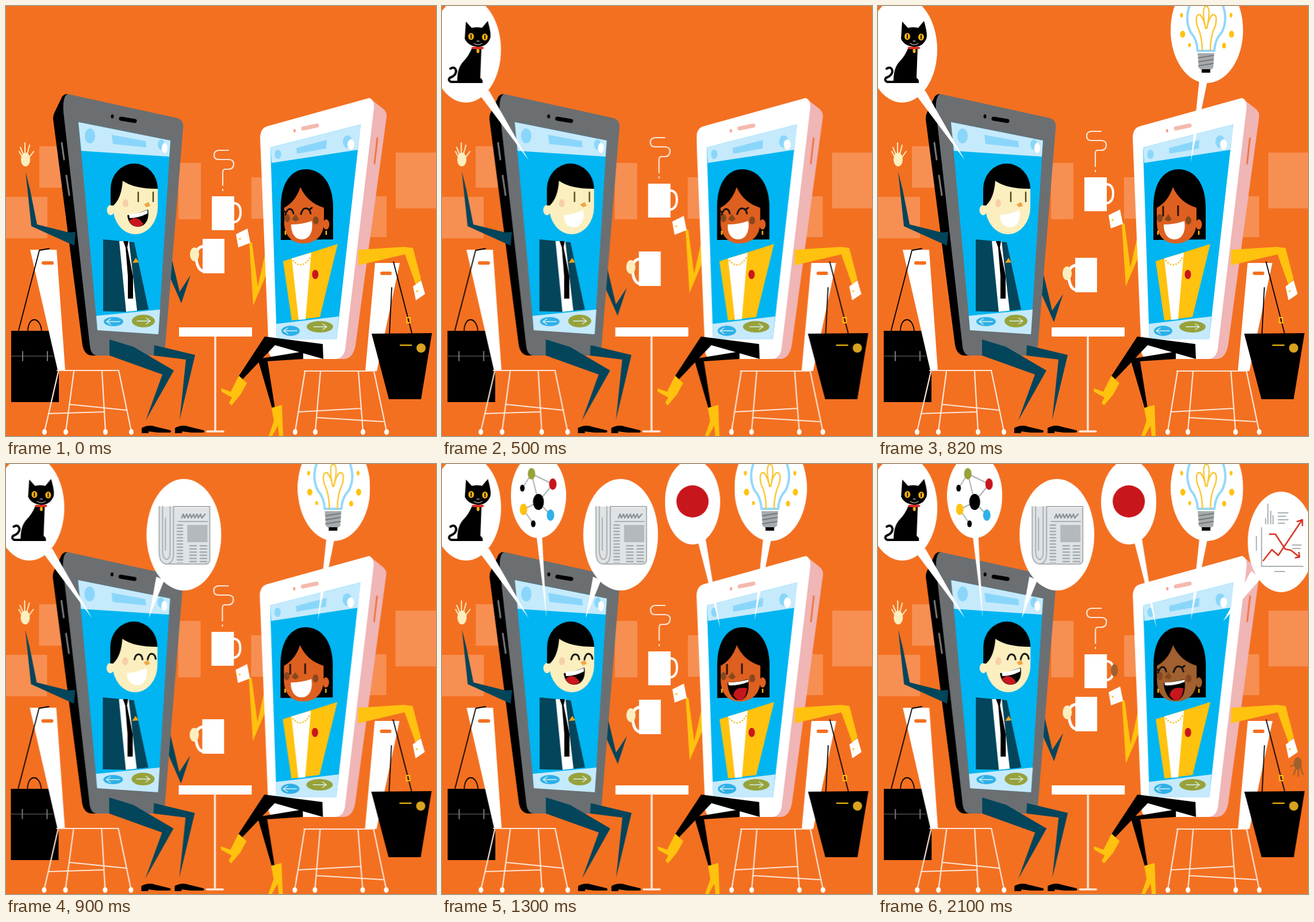
Recreate the animation shown at these times as an HTML page. Size 748 by 748 pixels, loop 2500 ms.

```html
<!DOCTYPE html>
<html lang="en">
<head>
<meta charset="utf-8">
<title>Phone chat</title>
<style>
  html, body { margin: 0; width: 100%; height: 100%; overflow: hidden; background: #f37021; }
  svg { display: block; width: 100%; height: 100%; }
  .line { fill: none; stroke-linecap: round; stroke-linejoin: round; }
  .thin { stroke: #fde6d8; stroke-width: 2.2; }
  .ink { stroke: #000; stroke-width: 1.8; }
  .navy { fill: #03455b; }
  .gold { fill: #ffc20e; }
  .white { fill: #fff; }
  .cream { fill: #fbefbf; }
  .red { fill: #c8161d; }
  .sky { fill: #00b5f1; }
  .pale { fill: #c5eafc; }
  .tint { fill: #8ad6fb; }
  .olive { fill: #97a23b; }
  .blue { fill: #2fb0e8; }
  .square { fill: #f78f52; }
  .skin { fill: #de6020; }
  .freckle { fill: #87471f; }
  .grey { stroke: #a9b0b4; stroke-width: 2; }
  .bubble { opacity: 0; }
</style>
</head>
<body>
<svg viewBox="0 0 748 748" preserveAspectRatio="none">
  <defs>
    <ellipse id="foot" rx="4" ry="5" fill="#fff"/>
    <path id="shoe" d="M236 743V734Q249 727 261 732L286 738Q289 742 284 742H264L248 740V743Z"/>
    <path id="arrow" class="line" stroke="#d8f0ee" stroke-width="1.5" d="M-11 0H11M5 -5L12 0L5 5"/>
  </defs>

  <rect width="748" height="748" fill="#f37021"/>
  <g id="scene">
    <path class="square" d="M58 244h57v72h-57zM-4 332h76v72H-4zM300 273h39v98h-39zM427 298h30v72h-30zM600 331h62v71h-62zM678 255h74v97h-74z"/>

    <!-- left chair and briefcase -->
    <path d="M9 565H92V689H9Z"/>
    <path class="line ink" d="M38 566C38 539 60 539 62 566"/>
    <path class="line" stroke="#4c4c4c" stroke-width="1.5" d="M9 609H82"/>
    <path class="line" stroke="#777" stroke-width="2" d="M29 601V617M72 601V617"/>
    <path class="white" d="M42 424H88L103 634H90Z"/>
    <path class="line" stroke="#f37021" stroke-width="6" d="M65 447H80"/>
    <path class="line ink" d="M22 564L58 425L75 422"/>
    <path class="line thin" d="M89 634H196M91 636L67 740M118 636L104 740M167 636L173 740M196 634L218 740M111 693L209 703M74 709L171 706"/>
    <use href="#foot" x="67" y="741"/><use href="#foot" x="104" y="741"/>
    <use href="#foot" x="173" y="741"/><use href="#foot" x="218" y="741"/>

    <!-- right chair and bag -->
    <path class="white" d="M642 447H685L645 635H625Z"/>
    <path class="line" stroke="#f37021" stroke-width="6" d="M654 465H668"/>
    <path class="line thin" d="M519 635H640M520 636L503 740M547 636L538 740M613 636L621 740M640 635L662 740M510 706L617 700M541 716L656 723"/>
    <use href="#foot" x="503" y="741"/><use href="#foot" x="538" y="741"/>
    <use href="#foot" x="621" y="741"/><use href="#foot" x="662" y="741"/>
    <path d="M636 570L741 569L722 684H666Z"/>
    <path class="line ink" d="M674 445L706 569M671 490L667 570"/>
    <path fill="none" stroke="#ffc20e" stroke-width="1.8" d="M697 542H703V551H697ZM685 590H706"/>
    <circle cx="722" cy="595" r="8" fill="#d9a320"/>

    <!-- table -->
    <path class="white" d="M301 559H428V575H301Z"/>
    <path class="line" stroke="#fde6d8" stroke-width="3.5" d="M364 575V739M350 740H378"/>

    <!-- his cup and arm -->
    <g id="hisCup">
      <path class="navy" d="M279 400L302 497L321 468L305 517L280 460Z"/>
      <path class="line" stroke="#fff" stroke-width="5" d="M343 418Q329 420 331 440Q333 459 343 461"/>
      <path class="white" d="M342 405H380V465H342Z"/>
      <ellipse class="cream" cx="328" cy="432" rx="8" ry="12"/>
    </g>

    <!-- her cup and arm -->
    <g id="herCup">
      <path class="line thin" d="M387 251H370Q362 252 362 259Q362 267 370 267H388Q397 268 396 276Q395 284 387 284H380Q377 285 377 290V312M377 319V321"/>
      <path class="line" stroke="#fff" stroke-width="4" d="M397 343Q408 344 408 359Q408 374 397 376"/>
      <path class="white" d="M358 331H397V390H358Z"/>
      <ellipse class="hand" cx="410" cy="359" rx="6" ry="11" fill="#a0602f"/>
      <path class="gold" d="M423 410L428 412L438 488L455 412L458 455L430 521Z"/>
      <path class="white" d="M400 397L420 387L425 412L404 420Z"/>
      <circle class="gold" cx="407" cy="405" r="1.7"/>
    </g>

    <!-- his phone -->
    <path d="M107 153Q99 153 96 161L84 186Q82 190 82 197L133 590Q136 606 148 608H180L120 170Z"/>
    <path class="line" stroke="#777b7e" stroke-width="3" d="M97 238L101 267M105 295L110 329"/>
    <path fill="#6b6f72" d="M107 153L298 195Q310 199 308 213L277 592Q275 607 262 608H158Q148 607 146 592L100 185Q98 158 107 153Z"/>
    <path class="line" stroke="#000" stroke-width="7" d="M200 196L224 200"/>
    <ellipse cx="185" cy="192" rx="2.5" ry="3.5"/>
    <path class="sky" d="M126 202L286 234L265 571L159 563Z"/>
    <path class="pale" d="M126 202L286 234L284 262L131 252ZM157 539L268 528L265 571L159 564Z"/>
    <g class="tint">
      <ellipse cx="146" cy="226" rx="9" ry="13"/>
      <path d="M184 224L243 235L244 246L186 240Z"/>
      <ellipse cx="270" cy="241" rx="6" ry="9"/>
    </g>
    <ellipse class="white" cx="276" cy="247" rx="5" ry="9"/>
    <ellipse class="blue" cx="187" cy="549" rx="17" ry="8"/>
    <use href="#arrow" transform="translate(187 549) scale(-1 1)"/>
    <ellipse class="olive" cx="239" cy="548" rx="20" ry="11"/>
    <use href="#arrow" transform="translate(239 548)"/>
    <path class="navy" d="M169 406L223 411L248 528L209 532L169 531Z"/>
    <path class="white" d="M197 409H214L228 530L209 532Z"/>
    <path d="M204 409H213L211 420L221 470V509H212V470L208 420Z"/>
    <path fill="#f5a11a" d="M220 447L226 438L231 446Z"/>

    <!-- his head -->
    <ellipse class="cream" cx="182" cy="355" rx="6.5" ry="9"/>
    <path class="cream" d="M186 340L203 303L264 316V350A39 47 0 0 1 186 350Z"/>
    <path d="M182 347V318A41 44 0 0 1 264 318Q222 318 203 304Q201 334 187 347Z"/>
    <ellipse cx="208" cy="343" rx="5" ry="7" fill="#f8cfa8"/>
    <path fill="#f2a444" d="M240 345L248 341L251 348L244 350Z"/>
    <path id="hisStare" class="line" stroke="#54481c" stroke-width="2.5" d="M230 324V340M256 324V340"/>
    <path id="hisSmile" class="line" stroke="#111" stroke-width="3" d="M224 340Q226 331 231 331Q237 331 238 340M247 340Q249 330 254 330Q260 331 261 339"/>
    <path id="hisGrin" class="white" d="M211 364Q230 362 245 355C248 372 241 385 229 385Q212 384 211 364Z"/>
    <g id="hisLaugh">
      <path d="M211 364Q230 361 247 354C250 372 242 384 229 384Q213 383 211 364Z"/>
      <path class="white" d="M214 362Q230 361 246 355V361Q230 369 215 369Z"/>
      <path class="red" d="M214 374Q227 362 239 379Q235 384 228 384Q218 382 214 374Z"/>
    </g>

    <!-- his waving arm and legs -->
    <path class="navy" d="M34 288L42 320L54 380L110 394L121 393L119 417L44 383Z"/>
    <ellipse class="cream" cx="34" cy="267" rx="8" ry="12"/>
    <path class="line" stroke="#fbefbf" stroke-width="2" d="M30 258L25 246M33 256L33 238M37 257L41 242M40 264L48 253M28 262L23 253"/>
    <path class="navy" d="M180 580L222 593L292 634L243 721L272 641L180 608ZM258 590L329 607L302 720L313 615L257 608Z"/>
    <use href="#shoe"/>
    <use href="#shoe" x="58"/>

    <!-- her phone -->
    <path fill="#f0b5b5" d="M632 160L655 178Q663 184 662 193L608 590Q604 613 588 614H560L630 165Z"/>
    <path class="line" stroke="#ee7740" stroke-width="3" d="M646 230L641 274"/>
    <path class="white" d="M632 160Q641 163 640 178L590 597Q587 614 572 614H470Q458 613 457 600L442 228Q443 212 455 209Z"/>
    <path class="line" stroke="#f5b9ae" stroke-width="7" d="M517 213L541 208"/>
    <ellipse cx="502" cy="217" rx="2" ry="3" fill="#f5a08a"/>
    <path class="sky" d="M460 246L617 206L575 580H471Z"/>
    <path class="pale" d="M460 246L617 206L613 250L462 273ZM470 553L579 540L575 580H471Z"/>
    <g class="tint">
      <ellipse cx="473" cy="258" rx="5.5" ry="8"/>
      <path d="M505 247L558 233L557 248L506 257Z"/>
      <ellipse cx="594" cy="236" rx="8" ry="11"/>
    </g>
    <ellipse class="white" cx="600" cy="241" rx="6" ry="9"/>
    <ellipse class="blue" cx="495" cy="565" rx="16" ry="9"/>
    <use href="#arrow" transform="translate(495 565) scale(-1 1)"/>
    <ellipse class="olive" cx="546" cy="558" rx="23" ry="10"/>
    <use href="#arrow" transform="translate(546 558)"/>
    <path class="gold" d="M482 444L577 414L546 541L497 547Z"/>
    <path class="white" d="M497 439L531 429L521 545L509 546Z"/>
    <path class="line" stroke="#f2c230" stroke-width="3" stroke-dasharray="0 5" d="M500 443Q515 460 529 437"/>
    <ellipse class="red" cx="538" cy="467" rx="5.5" ry="8"/>

    <!-- her head -->
    <path d="M478 407V350C478 306 497 284 522 284C550 284 569 310 569 350V406Z"/>
    <ellipse class="skin" cx="557" cy="380" rx="5.5" ry="9"/>
    <path class="skin" d="M484 351Q504 340 512 315Q524 342 553 351V376C553 400 538 413 517 413C498 413 484 400 484 376Z"/>
    <g class="freckle">
      <ellipse cx="489" cy="369" rx="5" ry="7"/><ellipse cx="539" cy="373" rx="5" ry="7"/>
      <path d="M497 371L504 362L510 371L504 375Z"/>
    </g>
    <path class="line" stroke="#ffc20e" stroke-width="2.5" d="M486 392V397M557 392V397"/>
    <path id="herStare" class="line" stroke="#24120a" stroke-width="3" d="M495 349V365M521 348V364"/>
    <path id="herSmile" class="line" stroke="#111" stroke-width="3" d="M486 363Q489 353 494 353Q499 354 500 361M482 356L487 359M513 362Q516 351 522 352Q528 352 530 361M528 354L532 351"/>
    <path id="herGrin" class="white" d="M496 380Q515 380 532 374C535 394 527 406 515 406C503 406 496 396 496 380Z"/>
    <g id="herLaugh">
      <path d="M496 380Q515 380 532 374C535 398 528 411 516 411C504 411 496 396 496 380Z"/>
      <path class="white" d="M497 380Q515 380 532 375V379Q515 386 498 385Z"/>
      <path class="red" d="M506 402Q509 386 530 390Q528 411 516 411Q510 409 506 402Z"/>
    </g>

    <!-- her resting arm and legs -->
    <path class="gold" d="M613 424L693 419L708 421L722 475L713 485L694 432L613 451Z"/>
    <path class="white" d="M708 488L722 477L729 501L713 512Z"/>
    <circle class="gold" cx="715" cy="496" r="1.7"/>
    <g class="hand" fill="#a0602f">
      <ellipse cx="729" cy="521" rx="7" ry="11"/>
      <path class="line" stroke="#a0602f" stroke-width="2.5" d="M724 522L717 526M726 529L722 540M730 529V543M734 527L738 540"/>
    </g>
    <path d="M450 575L551 588L552 614L468 590L411 650L404 645ZM438 614L517 601V614L455 618L468 700H463Z"/>
    <path class="gold" d="M405 643L419 656L408 676L392 695L388 690L393 681L375 671L374 665L391 671ZM462 699L480 694L482 748H475L473 730L463 748H457L466 722Z"/>

    <!-- speech bubbles -->
    <g class="bubble" data-from="1">
      <path class="white" d="M66 156L81 147L150 268Z"/>
      <ellipse class="white" cx="41" cy="76" rx="61" ry="92"/>
      <path d="M41 27L51 38Q60 36 69 38L79 26Q86 50 83 57Q77 71 62 71Q45 70 39 57ZM52 72Q46 87 37 96Q25 108 26 134H70Q71 128 66 125L68 72Z"/>
      <path class="line" stroke="#000" stroke-width="4" d="M30 132H15Q9 129 13 125Q24 121 24 113Q22 104 14 109"/>
      <g fill="#f9b314">
        <ellipse cx="50" cy="53" rx="5" ry="6"/><ellipse cx="74" cy="54" rx="5" ry="6"/>
        <ellipse cx="62" cy="78" rx="2.5" ry="4"/>
      </g>
      <path class="line ink" d="M50 50V56M74 51V57"/>
      <path class="line" stroke="#aaa" stroke-width="1.5" d="M60 61H64M55 65Q62 70 69 65"/>
      <path class="line" stroke="#dd2f20" stroke-width="4" d="M53 73H70"/>
    </g>
    <g class="bubble" data-from="5">
      <path class="white" d="M163 120H173L181 268Z"/>
      <ellipse class="white" cx="167" cy="55" rx="48" ry="74"/>
      <path class="line grey" d="M155 17L167 66L192 35ZM155 17L139 42M167 66L141 79L158 104M167 66L188 89"/>
      <ellipse cx="167" cy="66" rx="9.5" ry="14"/>
      <ellipse cx="139" cy="42" rx="4" ry="6"/><ellipse cx="158" cy="104" rx="4" ry="6"/>
      <ellipse class="olive" cx="155" cy="17" rx="6.5" ry="10"/>
      <ellipse class="red" cx="192" cy="35" rx="6.5" ry="10"/>
      <ellipse class="blue" cx="188" cy="89" rx="6.5" ry="10"/>
      <ellipse class="gold" cx="141" cy="79" rx="6.5" ry="10"/>
    </g>
    <g class="bubble" data-from="3">
      <path class="white" d="M262 196L276 202L249 268Z"/>
      <ellipse class="white" cx="310" cy="123" rx="65" ry="97"/>
      <path fill="#dfe3e5" d="M267 74H292V76H355V168Q354 174 348 174H279Q267 172 267 155Z"/>
      <path class="line grey" d="M267 74V155Q268 174 281 174Q292 172 292 155V74M273 74V154Q275 166 280 166Q286 165 286 154V74M278 94V150M292 74H355V168Q354 174 348 174H281M300 100H351"/>
      <path class="line" stroke="#858c90" stroke-width="2" d="M306 94L309 87L311 94L315 87L317 94L321 87L323 94L327 87L329 94L333 87L335 94L339 87L341 94L347 87"/>
      <path fill="#b3b9bd" d="M316 106H351V136H316Z"/>
      <path fill="none" stroke="#a4abaf" stroke-width="11" stroke-dasharray="2.5 3" d="M303 105V172"/>
      <path fill="none" stroke="#a4abaf" stroke-width="13" stroke-dasharray="2.5 3" d="M326 141V172M344 141V172"/>
    </g>
    <g class="bubble" data-from="4">
      <path class="white" d="M445 137L458 131L483 285Z"/>
      <ellipse class="white" cx="435" cy="66" rx="48" ry="74"/>
      <circle class="red" cx="435" cy="65" r="28"/>
    </g>
    <g class="bubble" data-from="2">
      <path class="white" d="M558 128L572 130L543 272Z"/>
      <ellipse class="white" cx="571" cy="42" rx="63" ry="92"/>
      <path class="line" stroke="#92d7fb" stroke-width="4" d="M543 -6Q531 22 543 46Q554 58 555 78H584Q585 58 597 46Q609 22 597 -6"/>
      <path class="line" stroke="#f9c634" stroke-width="2.5" d="M563 77Q563 52 554 34Q550 14 559 15Q566 22 569 39Q561 2 570 0Q579 2 571 39Q575 18 582 15Q590 15 586 34Q577 52 577 77"/>
      <g class="gold">
        <ellipse cx="529" cy="49" rx="4.5" ry="6"/><ellipse cx="541" cy="68" rx="2.5" ry="3.5"/>
        <ellipse cx="614" cy="49" rx="4.5" ry="6"/><ellipse cx="601" cy="69" rx="3.5" ry="5"/>
        <ellipse cx="527" cy="16" rx="2.5" ry="4"/><ellipse cx="613" cy="16" rx="2.5" ry="4"/>
      </g>
      <path fill="#a7abad" d="M555 82H584L582 108L577 111H562L557 108Z"/>
      <path class="line" stroke="#74797c" stroke-width="2" d="M557 90L582 86M557 97L582 93M557 104L582 100"/>
      <path d="M562 110H577V116H562Z"/>
    </g>
    <g class="bubble" data-from="6">
      <path class="white" d="M648 186L664 200L599 274Z"/>
      <ellipse class="white" cx="700" cy="135.500" rx="58" ry="87.500"/>
      <path class="line grey" d="M666 111V178H738M677 70V104M682 82V104M673 95V104M686 90V104M695 85H712M695 91H708M695 97H712M695 103H706M657 126V150M689 187H706M720 141H735M720 147H733"/>
      <path class="line" stroke="#d7301f" stroke-width="2.5" d="M669 168L684 149L695 159L736 98M728 100L737 97L737 107M680 122H690L707 148L717 150L732 162M725 163L732 162L731 154"/>
    </g>
  </g>
</svg>
<script>
  const DURATION = 2500;
  const times = [0, 500, 700, 900, 1100, 1300, 1500];
  const lift = [0, 22, 33, 39, 16, 5, 0];
  const drift = [0, 0.5, 1, -0.6, 0.2, 0.7, 1.2];

  // Holds each value until the next step.
  function play(target, property, values) {
    const frames = values.map((value, i) => ({
      [property]: value, offset: times[i] / DURATION, easing: 'step-end'
    }));
    frames.push({ [property]: values[values.length - 1], offset: 1 });
    const elements = typeof target === 'string' ? document.querySelectorAll(target) : [target];
    elements.forEach(el => el.animate(frames, { duration: DURATION, iterations: Infinity }));
  }

  const show = (target, first, last = 6) =>
    play(target, 'opacity', times.map((_, i) => (i >= first && i <= last ? 1 : 0)));

  play('#scene', 'transform', drift.map(x => `translate(${x}px, 0px)`));
  play('#hisCup', 'transform', lift.map(y => `translate(0px, ${y}px)`));
  play('#herCup', 'transform', lift.map(y => `translate(0px, ${-y}px)`));

  show('#hisStare', 0, 2);
  show('#hisSmile', 3);
  show('#hisGrin', 1, 4);
  play('#hisLaugh', 'opacity', [1, 0, 0, 0, 0, 1, 1]);

  show('#herStare', 2, 5);
  play('#herSmile', 'opacity', [1, 1, 0, 0, 0, 0, 1]);
  show('#herGrin', 0, 3);
  show('#herLaugh', 4);

  play('.skin', 'fill', times.map((_, i) => (i < 6 ? '#de6020' : '#a0602f')));
  show('.hand', 6);

  document.querySelectorAll('.bubble').forEach(el => show(el, Number(el.dataset.from)));
</script>
</body>
</html>
```
